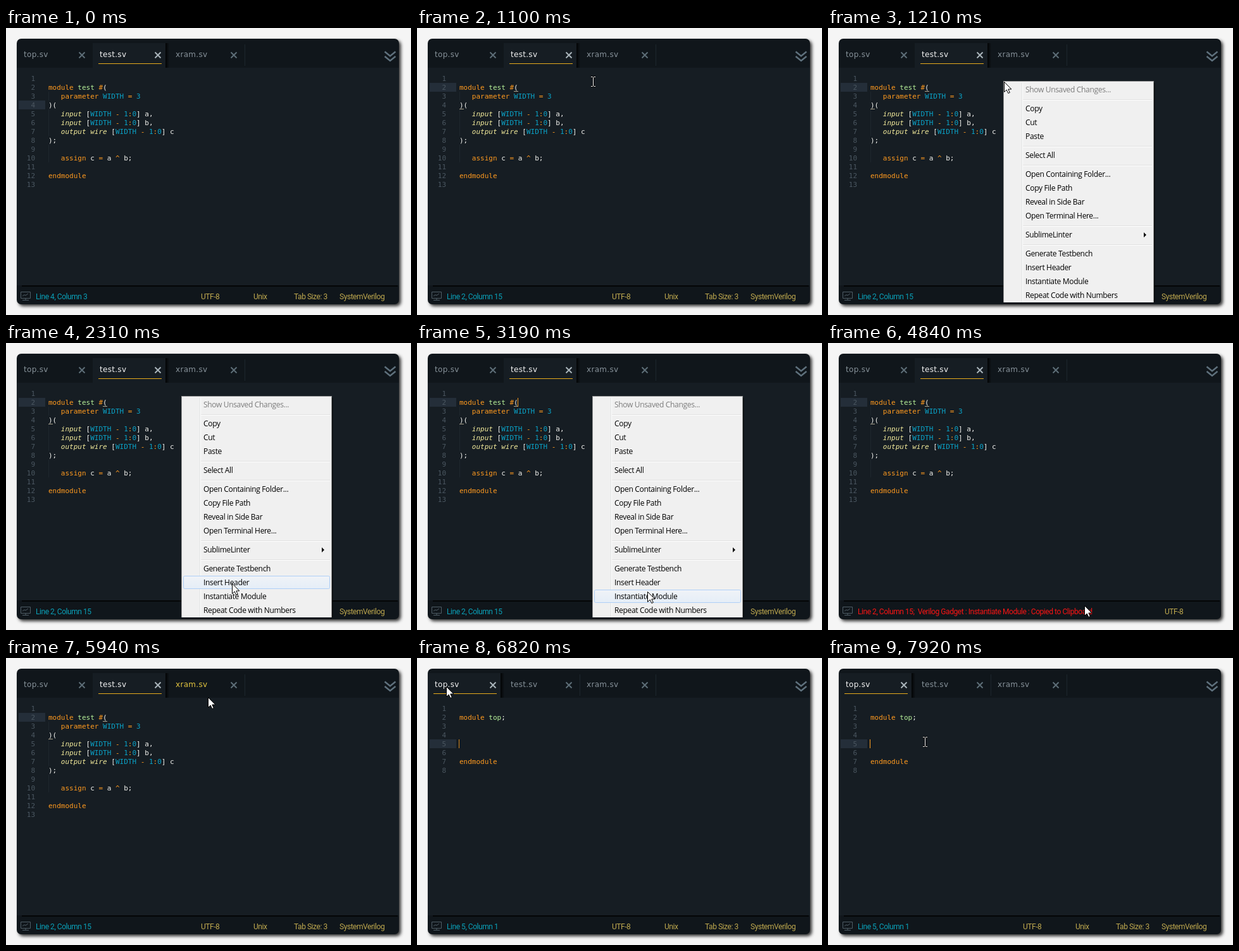
Write an HTML page with a canvas that moves like this. It is 640 by 455 pixels and loops after 8 s.

```html
<!DOCTYPE html>
<html lang="en">
<head>
<meta charset="utf-8">
<title>Editor: instantiate module</title>
<style>
html, body { margin: 0; width: 640px; height: 455px; overflow: hidden; background: #f5f5f5; }
canvas { display: block; }
</style>
</head>
<body>
<canvas id="stage" width="640" height="455"></canvas>
<script>
const ctx = document.getElementById('stage').getContext('2d');
const LOOP = 8000, STEP = 110;
const CLICK = 770, MENU_OPEN = 1210, COPIED = 3630, RESTORED = 5940, SWITCH = 6820;

const MONO = '"DejaVu Sans Mono", monospace';
const TAB_FONT = '12px "DejaVu Sans", sans-serif';
const MENU_FONT = '12px "Open Sans", sans-serif';
const STATUS_FONT = '12px Roboto, sans-serif';
const CHAR = 6.622, CODE_X = 67, LINE_H = 14;

// A letter before "|" picks the style of each code token.
const STYLES = { k: '#ff9a1f', n: '#b8f29a', v: '#0aa3c8', t: '#f4ec9c', w: '#f2f2ee' };
const RANGE = ' ~w|[~v|WIDTH~k| - ~v|1~k|:~v|0~w|] ';
const port = (kind, name) => `w|   ~t|${kind}~w|${RANGE}${name}`;
const FILES = {
  test: ['', 'k|module~n| test~k| #~w|(', 'k|   parameter~v| WIDTH~k| = ~v|3', 'w|)(',
    port('input', 'a,'), port('input', 'b,'), port('output wire', 'c'), 'w|);', '',
    'k|   assign~w| c~k| = ~w|a~k| ^ ~w|b;', '', 'k|endmodule', ''],
  top: ['', 'k|module~n| top~w|;', '', '', '', '', 'k|endmodule', '']
};

const MENU = ['Show Unsaved Changes...', '-', 'Copy', 'Cut', 'Paste', '-', 'Select All', '-',
  'Open Containing Folder...', 'Copy File Path', 'Reveal in Side Bar', 'Open Terminal Here...', '-',
  'SublimeLinter', '-', 'Generate Testbench', 'Insert Header', 'Instantiate Module',
  'Repeat Code with Numbers'];

// Pointer path: time, x, y
const PATH = [
  [220, 512, 230], [770, 285, 89], [990, 279, 88], [1100, 278, 85], [1320, 278, 85],
  [2200, 357, 381], [2420, 357, 381], [2750, 364, 394], [3520, 364, 394], [3630, 365, 395],
  [3960, 365, 395], [4510, 393, 393], [4620, 431, 412], [4840, 405, 416], [4950, 405, 416],
  [5500, 86, 417], [5830, 316, 59], [5940, 319, 62], [6380, 46, 45], [7040, 46, 45],
  [7590, 151, 130], [7700, 153, 133], [8000, 153, 133]
];

function pointerAt(t) {
  const i = PATH.findIndex(key => key[0] > t);
  const [t0, x0, y0] = PATH[i - 1], [t1, x1, y1] = PATH[i];
  const u = (t - t0) / (t1 - t0), e = u * u * (3 - 2 * u);
  return { x: Math.round(x0 + (x1 - x0) * e), y: Math.round(y0 + (y1 - y0) * e) };
}

function rect(x, y, w, h, color) {
  ctx.fillStyle = color;
  ctx.fillRect(x, y, w, h);
}

function text(str, x, y, color, font, spacing = 0, align = 'left') {
  ctx.font = font;
  ctx.letterSpacing = spacing + 'px';
  ctx.textAlign = align;
  ctx.fillStyle = color;
  ctx.fillText(str, x, y);
}

function stroke(path, color, width) {
  ctx.strokeStyle = color;
  ctx.lineWidth = width;
  ctx.stroke(new Path2D(path));
}

function drawWindow() {
  rect(0, 0, 640, 455, '#f5f5f5');
  ctx.save();
  ctx.shadowColor = 'rgba(0,0,0,.8)';
  ctx.shadowBlur = 5;
  ctx.shadowOffsetX = ctx.shadowOffsetY = 3;
  ctx.fillStyle = '#10161b';
  ctx.beginPath();
  ctx.roundRect(17, 17, 604, 421, 7);
  ctx.fill();
  ctx.restore();
  rect(17, 63, 604, 345, '#161d23');
  rect(25, 408, 594, 2, '#030506');
}

function drawTabs(active, hovered) {
  ['top.sv', 'test.sv', 'xram.sv'].forEach((name, i) => {
    const x = 20 + 120 * i, on = i === active;
    if (on) {
      const left = i ? x - 3 : 17;
      rect(left, 24, x + 112 - left, 39, '#161d23');
      const shade = ctx.createLinearGradient(x + 112, 0, x + 118, 0);
      shade.addColorStop(0, '#020304');
      shade.addColorStop(1, '#10161b');
      rect(x + 112, 24, 6, 39, shade);
      rect(x + 6, 56, 100, 1, '#e8ac1c');
    } else {
      rect(x + 117, 26, 1, 34, '#1d262d');
    }
    const color = on ? '#f4f4f4' : i === hovered ? '#e3c53f' : '#87929a';
    text(name, x + 8, 46, color, TAB_FONT, .3);
    stroke(`M${x + 95.5} 38.5l9 9m0-9l-9 9`, on ? '#a9b4ba' : '#5d6d77', 2);
  });
  stroke('M598.5 37.5l8.5 7 8.5-7M598.5 45l8.5 7 8.5-7', '#5f717d', 2.5);
}

function drawCode(file, line, column, caret) {
  const rowTop = 73 + LINE_H * (line - 1);
  rect(20, rowTop, 42, LINE_H, '#242e39');
  FILES[file].forEach((row, i) => {
    const y = 84 + LINE_H * i;
    text(i + 1, 46, y, '#4b5761', '11px ' + MONO, 0, 'right');
    let x = CODE_X;
    for (const token of row ? row.split('~') : []) {
      const [style, str] = token.includes('|') ? token.split('|') : ['w', token];
      text(str, x, y, STYLES[style], (style === 't' ? 'italic ' : '') + '11px ' + MONO);
      x += str.length * CHAR;
    }
  });
  if (file === 'test') {
    for (const [y, h] of [[101, 14], [129, 42], [185, 28]]) rect(67, y, 1, h, '#1e272e');
    if (line === 2) {
      rect(153, 100, 7, 1, '#a8a18c');
      rect(67, 128, 7, 1, '#a8a18c');
    }
  }
  ctx.globalAlpha = caret;
  rect(Math.round(CODE_X - 1 + CHAR * (column - 1)), rowTop, 1, LINE_H, '#ffa01f');
  ctx.globalAlpha = 1;
}

function drawStatus(position, copied) {
  const put = (str, x, color) => text(str, x, 430, color, STATUS_FONT, -.45);
  stroke('M23.5 418.5h15v10h-15zM31 428.5v3M26 431.5h10M26 425l3-2 2 1 4-3', '#4f5d66', 1);
  if (copied) {
    put(position + ';  Verilog Gadget : Instantiate Module : Copied to Clipboard', 47, '#fa1414');
    put('UTF-8', 532, '#bfa94f');
  } else {
    put(position, 47, '#0aa0b8');
    [['UTF-8', 308], ['Unix', 391], ['Tab Size: 3', 455], ['SystemVerilog', 527]]
      .forEach(([str, x]) => put(str, x, '#bfa94f'));
  }
}

function drawMenu(pointer) {
  rect(279, 87, 238, 348, 'rgba(0,0,0,.45)');
  rect(277, 84, 238, 351, '#979797');
  rect(278, 85, 236, 350, '#f0f0f0');
  rect(306, 87, 1, 348, '#e2e3e3');
  rect(307, 87, 1, 348, '#fff');
  let y = 87;
  MENU.forEach((label, i) => {
    if (label === '-') {
      rect(308, y + 4, 204, 1, '#e0e0e0');
      rect(308, y + 5, 204, 1, '#fff');
      y += 8;
      return;
    }
    if (i && pointer.y >= y && pointer.y < y + 22) {
      const glow = ctx.createLinearGradient(0, y, 0, y + 22);
      glow.addColorStop(0, '#f0f3f7');
      glow.addColorStop(1, '#e4edf7');
      ctx.fillStyle = glow;
      ctx.strokeStyle = '#aecff7';
      ctx.lineWidth = 1;
      ctx.beginPath();
      ctx.roundRect(280.5, y + .5, 231, 20, 2);
      ctx.fill();
      ctx.stroke();
    }
    text(label, 312, y + 15, i ? '#000' : '#7c7c7c', MENU_FONT, -.33);
    if (label === 'SublimeLinter') {
      ctx.fill(new Path2D(`M499 ${y + 7}l4 4-4 4z`));
    }
    y += 22;
  });
}

function drawPointer({ x, y }, isArrow) {
  ctx.save();
  ctx.translate(x, y);
  if (isArrow) {
    const arrow = 'M.5.5V16.5L4.2 13 6.8 18.5 9.3 17.4 6.8 12H11.8z';
    ctx.fillStyle = '#fff';
    ctx.fill(new Path2D(arrow));
    stroke(arrow, '#000', 1);
  } else {
    const beam = 'M-3-7.5h2.5l1 1 1-1H4M.5-6.5V6.5M-3 7.5h2.5l1-1 1 1H4';
    stroke(beam, '#000', 2.4);
    stroke(beam, '#fff', 1);
  }
  ctx.restore();
}

function draw(now) {
  const time = now % LOOP;
  const t = time < 2 * STEP ? 0 : Math.floor(time / STEP) * STEP;
  const pointer = t ? pointerAt(t) : null;
  const onTop = t >= SWITCH, menuOpen = t >= MENU_OPEN && t < COPIED;
  const [line, column] = onTop ? [5, 1] : t >= CLICK ? [2, 15] : [4, 3];
  const blink = .5 - .9 * Math.cos(2 * Math.PI * (t - 1190) / 1200);
  const hovered = pointer && pointer.y < 64 ? Math.floor((pointer.x - 17) / 120) : -1;

  drawWindow();
  drawTabs(onTop ? 0 : 1, hovered);
  drawCode(onTop ? 'top' : 'test', line, column, Math.min(1, Math.max(0, blink)));
  drawStatus(`Line ${line}, Column ${column}`, t >= COPIED && t < RESTORED);
  if (menuOpen) drawMenu(pointer);
  if (pointer) drawPointer(pointer, menuOpen || pointer.y < 64 || pointer.y > 408);
  requestAnimationFrame(draw);
}

requestAnimationFrame(draw);
</script>
</body>
</html>
```
